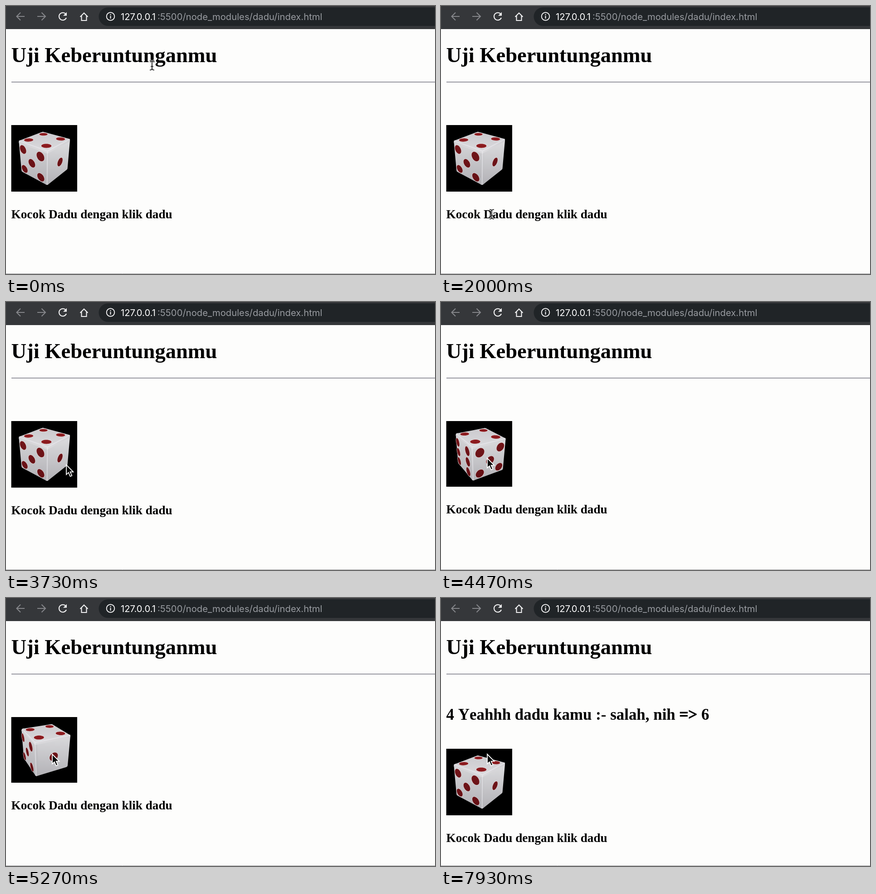
An HTML page with a canvas for the animation above (8000 ms loop, 946 px wide and 592 px high).

```html
<!DOCTYPE html>
<html lang="id">
<head>
<meta charset="utf-8">
<title>Uji Keberuntunganmu</title>
<style>
  html, body { margin: 0; width: 100%; height: 100%; overflow: hidden; background: #fdfdfc; }
  svg, canvas { position: absolute; left: 0; top: 0; }
  svg { width: 946px; height: 592px; }
  .serif { font-family: "Liberation Serif", "Times New Roman", serif; font-weight: bold; font-kerning: none; }
  .url { font: 20.25px Inter, sans-serif; }
  .icon { fill: none; stroke-width: 2.1; }
  #die { left: 11px; top: 263px; }

  #die, #caption, #result, #pointer, #beam, #arrow { animation: 8s linear infinite; }
  #die, #caption, #result, #beam, #arrow { animation-timing-function: step-end; }
  #die { animation-name: drop; }
  #caption { animation-name: caption; }
  #result { animation-name: reveal; }
  #pointer { animation-name: travel; }
  #beam { animation-name: beam; }
  #arrow { animation-name: arrow; }

  @keyframes drop { 0% { transform: none; } 74%, 100% { transform: translateY(70px); } }
  @keyframes caption {
    0% { transform: none; }
    49% { transform: translateY(-1.5px); }
    74%, 100% { transform: translateY(70px); }
  }
  @keyframes reveal { 0% { opacity: 0; } 74%, 100% { opacity: 1; } }
  @keyframes travel {
    0%, 3% { transform: translate(322px, 131px); animation-timing-function: ease-in-out; }
    12.5%, 15% { transform: translate(33px, 460px); }
    33.4% { transform: translate(178px, 460px); }
    41% { transform: translate(345px, 460px); animation-timing-function: ease-in-out; }
    48.5%, 100% { transform: translate(102px, 345px); }
  }
  @keyframes beam { 0%, 11.8% { opacity: 1; } 4.5%, 42.5%, 100% { opacity: 0; } }
  @keyframes arrow { 0%, 11.8% { opacity: 0; } 4.5%, 42.5%, 100% { opacity: 1; } }
</style>
</head>
<body>
<svg viewBox="0 0 946 592">
  <rect width="946" height="51" fill="#35373a"/>
  <path d="M946 3H225a20.5 20.5 0 0 0 0 41H946Z" fill="#202427"/>
  <g class="icon" stroke="#85868a">
    <path d="M41 23H24M32 14.500l-8.500 8.500 8.500 8.500"/>
    <path d="M69 23h17M78.500 14.500l8.500 8.500-8.500 8.500"/>
  </g>
  <g class="icon" stroke="#f1f1f2">
    <path d="M131.500 17.500A8.300 8.300 0 1 0 133 26"/>
    <path d="M134 13.500v8h-8z" fill="#f1f1f2" stroke="none"/>
    <path d="M163.500 24l8.500-8.500 8.500 8.500M166.500 21.500V32h11V21.500"/>
    <circle cx="230.500" cy="23" r="8.800" stroke-width="1.900"/>
    <path d="M230.500 21.700v6M230.500 18v2.200"/>
  </g>
  <text class="url" x="253" y="30.500" fill="#fff">127.0.0.1</text>
  <text class="url" x="334" y="30.500" fill="#989ba0">:5500/node_modules/dadu/index.html</text>

  <text class="serif" x="11.600" y="124" font-size="46.550">Uji Keberuntunganmu</text>
  <path d="M12 168H946" stroke="#96969f" stroke-width="2"/>
  <text id="result" class="serif" x="11.600" y="269" font-size="34.900">4 Yeahhh dadu kamu :- salah, nih <tspan stroke="#000">=&gt;</tspan> 6</text>
  <text id="caption" class="serif" x="11.600" y="468.500" font-size="27.200">Kocok Dadu dengan klik dadu</text>
  <path d="M0 591.500H946" stroke="#8e8e90"/>
</svg>

<canvas id="die" width="146" height="147"></canvas>

<svg viewBox="0 0 946 592">
  <defs>
    <path id="ibeam" d="M-5 -10.500Q0 -10.500 0 -7V7Q0 10.500 -5 10.500M5 -10.500Q0 -10.500 0 -7V7Q0 10.500 5 10.500M-3 2.500H3" fill="none"/>
  </defs>
  <g id="pointer">
    <g id="beam">
      <use href="#ibeam" stroke="#fff" stroke-width="3.600"/>
      <use href="#ibeam" stroke="#111" stroke-width="1.700"/>
    </g>
    <path id="arrow" d="M0 0V21.500L4.800 17 8.600 25.500 12.300 23.900 8.600 15.600H15.300Z" fill="#000" stroke="#fff" stroke-width="1.800"/>
  </g>
</svg>

<script>
const LOOP = 8000, ROLL_START = 3920, ROLL_END = 5920;
const REST_ANGLE = 0.09, SPIN = -2.06;
const QUARTER = Math.PI / 2;
const PITCH_SIN = 0.47, PITCH_COS = 0.883, DISTANCE = 7.5, FOCAL = 292;
const CENTER_X = 74.5, CENTER_Y = 68.4;
const SIDES = [1, 2, 6, 5];
const ctx = document.getElementById('die').getContext('2d');

function pips(value) {
  const p = 0.6;
  const spots = value % 2 ? [[0, 0]] : [];
  if (value > 1) spots.push([-p, p], [p, -p]);
  if (value > 3) spots.push([p, p], [-p, -p]);
  if (value === 6) spots.push([-p, 0], [p, 0]);
  return spots;
}

function project(x, y, z) {
  const scale = FOCAL / (DISTANCE - y * PITCH_SIN - z * PITCH_COS);
  return [CENTER_X + x * scale, CENTER_Y - (y * PITCH_COS - z * PITCH_SIN) * scale];
}

// Both return a mapping from face coordinates to the screen.
function sideFace(angle) {
  const s = Math.sin(angle), c = Math.cos(angle);
  return (u, v, h) => project(h * s + u * c, v, h * c - u * s);
}
function topFace(angle) {
  const s = Math.sin(angle), c = Math.cos(angle);
  return (u, v, h) => project(u * c + v * s, h, v * c - u * s);
}

function trace(points) {
  ctx.beginPath();
  points.forEach(([x, y]) => ctx.lineTo(x, y));
  ctx.closePath();
}

function verticalGradient(y0, y1, from, to) {
  const g = ctx.createLinearGradient(0, y0, 0, y1);
  g.addColorStop(0, from);
  g.addColorStop(1, to);
  return g;
}

function drawFace(face, value, paint, pipColor, pipDepth) {
  const e = 0.9;
  trace([[-e, -e], [e, -e], [e, e], [-e, e]].map(([u, v]) => face(u, v, e)));
  ctx.fillStyle = ctx.strokeStyle = paint;
  ctx.lineWidth = 8;
  ctx.fill();
  ctx.stroke();
  for (const [u, v] of pips(value)) {
    trace(Array.from({ length: 28 }, (_, i) => {
      const a = i / 28 * 2 * Math.PI;
      return face(u + 0.24 * Math.cos(a), v + 0.24 * Math.sin(a), pipDepth);
    }));
    ctx.fillStyle = pipColor;
    ctx.strokeStyle = '#ead9da';
    ctx.lineWidth = 1.2;
    ctx.stroke();
    ctx.fill();
  }
}

function drawEdges(angle) {
  ctx.strokeStyle = 'rgba(240,240,244,.45)';
  ctx.lineWidth = 2.5;
  const corner = (a, y) => project(1.34 * Math.sin(a), y, 1.34 * Math.cos(a));
  for (let k = 0; k < 4; k++) {
    const a = angle + k * QUARTER;
    if (Math.cos(a) < 0.7) continue;
    ctx.beginPath();
    ctx.moveTo(...corner(a, -0.93));
    ctx.lineTo(...corner(a, 0.96));
    ctx.lineTo(...corner(a - QUARTER, 0.96));
    ctx.moveTo(...corner(a, 0.96));
    ctx.lineTo(...corner(a + QUARTER, 0.96));
    ctx.stroke();
  }
}

function drawDie(angle, height) {
  ctx.clearRect(0, 0, 146, 147);
  ctx.fillStyle = '#000';
  ctx.fillRect(0.6, 0, 145.4, height);
  ctx.lineJoin = ctx.lineCap = 'round';
  SIDES.forEach((value, k) => {
    const normal = angle + (k + 0.5) * QUARTER;
    if (Math.cos(normal) * DISTANCE * PITCH_COS < 1) return;
    const light = Math.round(212 + 8 * Math.sin(normal + 0.9));
    const paint = verticalGradient(35, 136, `rgb(${light},${light},${light + 2})`, '#b0afb4');
    drawFace(sideFace(normal), value, paint, verticalGradient(40, 130, '#72161a', '#640f14'), 1.04);
  });
  drawFace(topFace(angle + QUARTER / 2), 4, verticalGradient(12, 58, '#cac9cd', '#dad9dc'), '#8c1b1f', 1);
  drawEdges(angle);
}

function frame(now) {
  const t = now % LOOP;
  const rolling = t >= ROLL_START && t < ROLL_END;
  if (rolling) drawDie(1.316 + SPIN * (t - 4470) / 1000, 145);
  else drawDie(REST_ANGLE, 147);
  requestAnimationFrame(frame);
}
requestAnimationFrame(frame);
</script>
</body>
</html>
```
